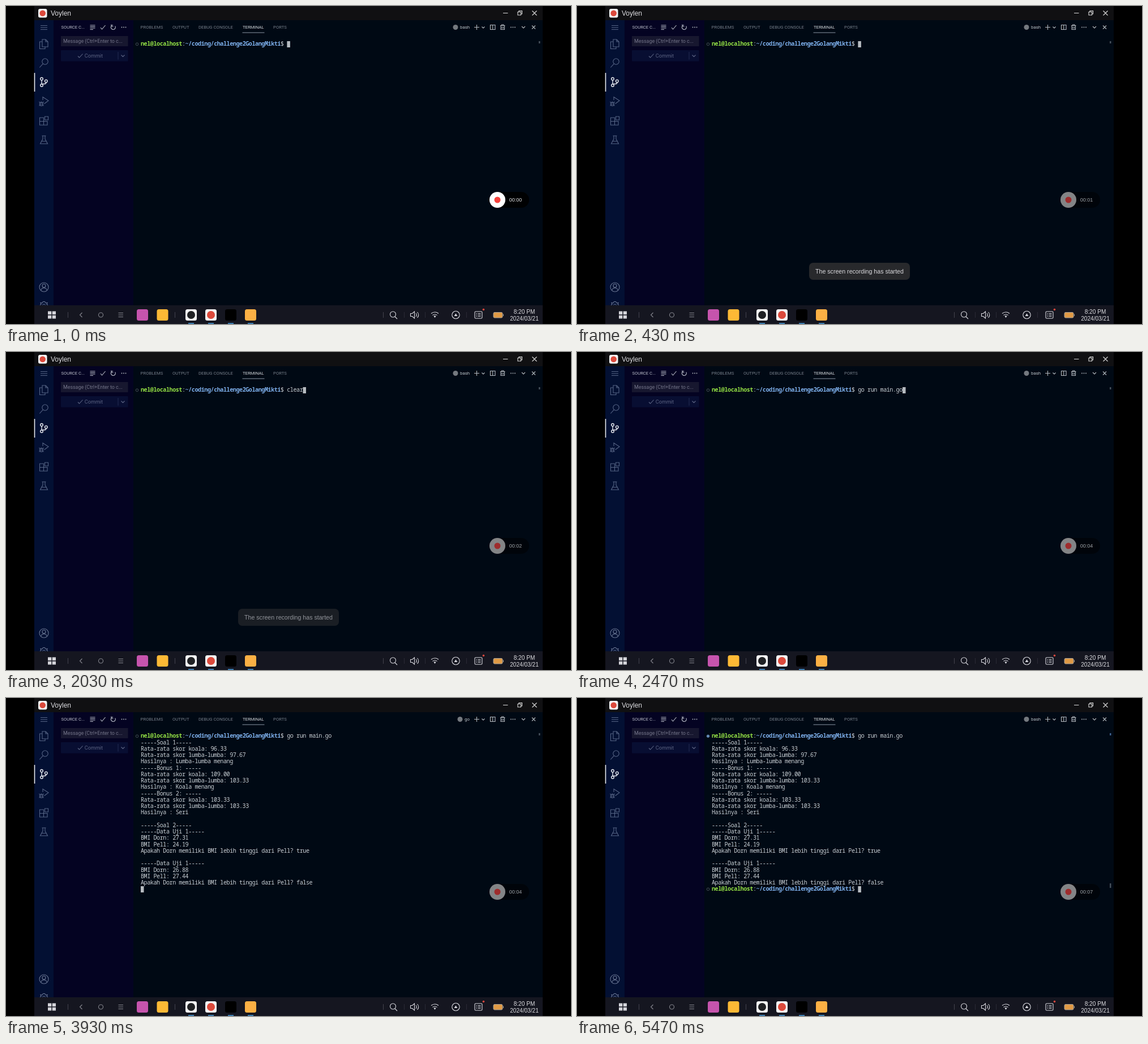
Write an HTML page that moves like this. It is 998 px wide and 561 px high and loops after 6.46 s.

```html
<!DOCTYPE html>
<html lang="en">
<head>
<meta charset="utf-8">
<title>Terminal recording</title>
<style>
  html, body { margin: 0; width: 100%; height: 100%; overflow: hidden; background: #000; }
  svg { display: block; width: 998px; height: 561px; }
  text { white-space: pre; }
  .line { fill: none; stroke-width: 1.1; }
  .bold { stroke-width: 1.4; }
  .ui { font-family: Roboto, sans-serif; }
  .system { font-family: "Liberation Sans", Arial, sans-serif; fill: #dcdce0; }
  /* Characters sit on a fixed cell grid. */
  .mono { font: 10.1px "Noto Sans Mono", monospace; letter-spacing: calc(5.617px - .6em); fill: #cbd0d5; }
  .user { font-weight: 700; fill: #93e045; }
  .path { font-weight: 700; fill: #7eb0ec; }
</style>
</head>
<body>
<svg viewBox="0 0 998 561">
  <rect width="998" height="561"/>
  <rect x="50" width="898" height="26" fill="#101012"/>
  <rect x="50" y="25" width="34" height="503" fill="#031033"/>
  <rect x="84" y="25" width="141" height="503" fill="#040322"/>
  <rect x="225" y="25" width="723" height="503" fill="#000914"/>

  <!-- title bar -->
  <rect x="57" y="5" width="15.5" height="15.5" rx="3" fill="#f4f4f4"/>
  <circle cx="64.7" cy="12.7" r="5.3" fill="#dc4a3c"/>
  <text class="system" x="79" y="17" font-size="12">Voylen</text>
  <path class="line" stroke="#dcdcdc" d="M878 12.5h8.500M904 10.500h5.500v5.500h-5.500zM906 10.500v-2h5.500v5.500h-2M929.500 8.500l8 8M937.500 8.500l-8 8"/>

  <!-- activity bar -->
  <rect x="49.700" y="118" width="1.6" height="33" fill="#e8eaf0"/>
  <g class="line" stroke="#566485">
    <path d="M61 34.500h12M61 38h12M61 41.500h12"/>
    <path d="M64 59h6l4 4v9h-10zM70 59v4h4M64 63h-4.500v12.500h9.500v-3.500"/>
    <circle cx="69" cy="98" r="5.2"/>
    <path d="M65.300 101.800l-6 6.700"/>
    <path d="M65 166v-5.500l10 6.500-7.500 5.500M60 170.500h5v3.500q0 2-2.500 2t-2.500-2zM61 170.500q1.500-3 3 0M58.500 169l1.500 1.500M66.500 169l-1.500 1.500M58.500 173h7.500M58.500 176l1.500-1M66.500 176l-1.500-1"/>
    <path d="M59.500 197h7v13h-7zM59.500 203.500h13.500v6.500h-6.500M73 203.500v6.500M68.500 195h6v6h-6z"/>
    <path d="M63.500 229h7M65 229v5.500l-4.500 8.500h13l-4.500-8.500v-5.500M63 238.500h8"/>
  </g>
  <g class="line bold" stroke="#e6e8ee">
    <circle cx="63" cy="128.600" r="2.300"/><circle cx="63" cy="140" r="2.300"/><circle cx="70.800" cy="132.400" r="2.300"/>
    <path d="M63 131v6.500M70.800 135q0 2.500-3 2.500h-4"/>
  </g>
  <g class="line" stroke="#6a7693">
    <circle cx="67" cy="496" r="8"/><circle cx="67" cy="493.500" r="3"/>
    <path d="M61.500 502q1-4.500 5.500-4.500t5.500 4.500"/>
    <path d="M60 527.500l2-1-1-3 3 .5 1.500-2.500h3l1.500 2.500 3-.5-1 3 2 1M64.500 527.500q2.500-3 5 0"/>
  </g>

  <!-- source control side bar -->
  <text class="ui" x="97.500" y="39.500" font-size="7.600" fill="#bcbfca">SOURCE C...</text>
  <path class="line" stroke="#b9bdc8" d="M148.500 34h9M148.500 36.500h9M148.500 39h9M148.500 41.500h5.500M167 38l2.500 3 6-7M192.800 35.500a4 4 0 1 1-4-2M186 32.500v3.500h3.500"/>
  <rect x="97" y="53" width="118.500" height="18" fill="#17172f"/>
  <text class="ui" x="101" y="65" font-size="8.900" fill="#74758a">Message (Ctrl+Enter to c...</text>
  <rect x="97" y="78" width="118.500" height="19.500" rx="1" fill="#080e32"/>
  <text class="ui" x="138.800" y="91" font-size="9.100" fill="#5d6584">Commit</text>
  <path class="line" stroke="#5d6584" d="M127 88.500l2.500 2.500 6-6.500M203.500 86.500l3 3 3-3"/>
  <path class="line" stroke="#222b52" d="M198 81v13.500"/>

  <!-- panel tabs -->
  <g class="ui" font-size="7.750" fill="#777f8a">
    <text x="237.500" y="39.500">PROBLEMS</text>
    <text x="294" y="39.500">OUTPUT</text>
    <text x="340" y="39.500">DEBUG CONSOLE</text>
    <text x="418" y="39.500" fill="#d8dbdf">TERMINAL</text>
    <text x="472" y="39.500">PORTS</text>
  </g>
  <path class="line" stroke="#8d98a5" d="M417.500 47h39"/>
  <g id="shell">
    <circle cx="794" cy="37.500" r="4.500" fill="#74797f"/>
    <text id="shellName" class="ui" x="802" y="40" font-size="7.900" fill="#bfc4c9"/>
  </g>
  <path class="line" stroke="#b4b9bf" d="M827 37.500h9M831.500 33v9M840.500 36.500l2.500 2.500 2.500-2.500M855.500 33.500h8.500v8h-8.500zM859.700 33.500v8M873 34.500h8.500M875.500 34.500v-1.500h3.500v1.500M874 35v6.500h6.500v-6.500M876 36.500v3.500M878.500 36.500v3.500M911 36l3 3 3-3M929 34.500l6 6M935 34.500l-6 6"/>
  <g id="dots" fill="#b4b9bf"></g>

  <g id="terminal" class="mono"></g>

  <!-- recorder -->
  <rect id="pill" x="854" y="328" width="70" height="28" rx="14"/>
  <circle id="button" cx="868" cy="342" r="14"/>
  <circle id="recordDot" cx="868" cy="342" r="5.500"/>
  <text id="counter" class="system" x="888.700" y="345.200" font-size="9"/>

  <g id="toast">
    <rect x="410" y="453" width="178" height="30" rx="7" fill="#28292c"/>
    <text class="system" x="421" y="472" font-size="10.630">The screen recording has started</text>
  </g>

  <!-- taskbar -->
  <rect x="50" y="528" width="898" height="33" fill="#151620"/>
  <path fill="#d4d4da" d="M74 538.500h6.300v5.800h-6.300zM81.700 538.500h6.300v5.800h-6.300zM74 545.700h6.300v5.800h-6.300zM81.700 545.700h6.300v5.800h-6.300z"/>
  <path class="line" stroke="#41424c" d="M109.500 540v10M298.500 540v10M666.500 540v10"/>
  <path class="line" stroke="#292a35" d="M703.500 540v10M740.500 540v10M813.500 540v10"/>
  <g class="line" stroke="#878890">
    <path d="M134.500 541l-4 4 4 4M198.500 541.500h8.500M198.500 545h8.500M198.500 548.500h8.500"/>
    <circle cx="167.500" cy="545" r="4"/>
  </g>
  <g id="apps"></g>
  <circle cx="327" cy="545" r="7" fill="#202124"/>
  <circle cx="362" cy="545" r="7" fill="#dc4a3c"/>
  <g class="line" stroke="#d8d8de">
    <circle cx="683.500" cy="544" r="5"/>
    <path d="M687 548l4 4"/>
    <path d="M714.500 542.500h3l4-3.500v12l-4-3.500h-3zM724 542q2.500 3 0 6M726.500 540q4.500 5 0 10"/>
    <path d="M751 542.500q6.500-5 13 0M753.500 545.500q4-3 8 0"/>
    <circle cx="794.500" cy="545" r="6.700"/>
    <rect x="828" y="539" width="13" height="12" rx="1.500"/>
    <path d="M830.500 542.500h1.500M833.500 542.500h5M830.500 545h1.500M833.500 545h5M830.500 547.500h1.500M833.500 547.500h5"/>
  </g>
  <path fill="#d8d8de" d="M755.500 547q2-1.500 4 0l-2 3zM791.500 547l3-4.500 3 4.500z"/>
  <circle cx="843.500" cy="535.500" r="1.800" fill="#e8483e"/>
  <rect x="861" y="540.500" width="16" height="9.500" rx="2" fill="#e09a45" stroke="#a7a19a"/>
  <path d="M878.500 543.500v3.500" stroke="#a7a19a"/>
  <g class="system" text-anchor="middle" font-size="10.100">
    <text x="915.500" y="542.500">8:20 PM</text>
    <text x="915.500" y="555">2024/03/21</text>
  </g>
</svg>

<script>
const LOOP = 6460, LEFT = 238, BASELINE = 70.3, ROW = 11.25, CELL = 5.617;
const byId = id => document.getElementById(id);

const prompt = '<tspan class="user">nel@localhost</tspan>:' +
  '<tspan class="path">~/coding/challenge2GolangMikti</tspan>$ ';
const promptLength = prompt.replace(/<[^>]+>/g, '').length;
const runCommand = 'go run main.go';

const output = `-----Soal 1-----
Rata-rata skor koala: 96.33
Rata-rata skor lumba-lumba: 97.67
Hasilnya : Lumba-lumba menang
-----Bonus 1: -----
Rata-rata skor koala: 109.00
Rata-rata skor lumba-lumba: 103.33
Hasilnya : Koala menang
-----Bonus 2: -----
Rata-rata skor koala: 103.33
Rata-rata skor lumba-lumba: 103.33
Hasilnya : Seri

-----Soal 2-----
-----Data Uji 1-----
BMI Dorn: 27.31
BMI Pell: 24.19
Apakah Dorn memiliki BMI lebih tinggi dari Pell? true

-----Data Uji 1-----
BMI Dorn: 26.88
BMI Pell: 27.44
Apakah Dorn memiliki BMI lebih tinggi dari Pell? false`.split('\n');

// Each entry: start time and the values that change then.
const changes = [
  [0, { command: '', stage: 'typing', shell: 'bash', seconds: 0 }],
  [430, { seconds: 1 }],
  [1430, { command: 'clear', seconds: 2 }],
  [2230, { command: '', seconds: 3 }],
  [2470, { command: runCommand, seconds: 4 }],
  [3470, { stage: 'running' }],
  [3570, { shell: 'go' }],
  [3930, { stage: 'printed' }],
  [4200, { stage: 'done' }],
  [4370, { shell: 'bash', seconds: 5 }],
  [5470, { seconds: 7 }]
];

const textLine = (content, row) =>
  `<text x="${LEFT}" y="${BASELINE + row * ROW}">${content}</text>`;

function marker(row, filled) {
  const y = 67.3 + row * ROW;
  return `<circle cx="231.500" cy="${y}" r="2.300" fill="${filled ? '#668bb8' : 'none'}" stroke="${filled ? '#668bb8' : '#59616a'}" stroke-width=".8"/>`;
}

function terminalMarkup({ command, stage }) {
  const printed = stage === 'printed' || stage === 'done';
  const done = stage === 'done';
  const lines = [prompt + command];
  if (printed) lines.push(...output);
  let row = stage === 'typing' ? 0 : lines.length;
  let column = stage === 'typing' ? promptLength + command.length : 0;
  if (done) {
    row = lines.length;
    column = promptLength;
    lines.push(prompt);
  }
  let markup = lines.map(textLine).join('') + marker(0, done);
  markup += `<rect x="941" y="62" width="2.500" height="4" fill="${done ? '#3e618e' : '#444e59'}"/>`;
  if (done) {
    markup += marker(row, false) + '<rect x="941" y="327" width="2.500" height="8" fill="#444e59"/>';
  }
  return markup + `<rect x="${LEFT + column * CELL}" y="${62 + row * ROW}" width="5.500" height="11" fill="#b6bbc0"/>`;
}

const mix = (from, to, amount) =>
  `rgb(${from.map((value, i) => Math.round(value + (to[i] - value) * amount))})`;

// Fades advance in the given number of visible steps.
const steppedFade = (time, start, end, steps) => time < start ? 0 :
  Math.min(1, (Math.floor((time - start) / (end - start) * (steps - 1) + 1e-6) + 1) / steps);

byId('dots').innerHTML = [208, 895.5].map(x =>
  [-3.5, 0, 3.5].map(dx => `<circle cx="${x + dx}" cy="37.500" r=".9"/>`).join('')).join('');

byId('apps').innerHTML = [
  [241, '#c654ad'], [276.5, '#fdb935'], [327, '#f4f4f4'],
  [362, '#f4f4f4'], [397, '#000'], [432, '#fbb044']
].map(([x, color]) =>
  `<rect x="${x - 10}" y="535" width="20" height="20" rx="3.500" fill="${color}"/>` +
  (x > 300 ? `<rect x="${x - 5}" y="559" width="10" height="2" fill="#3a7caf"/>` : '')
).join('');

let shownMarkup = '';
function render() {
  const time = performance.now() % LOOP;
  const state = Object.assign({}, ...changes.filter(([start]) => start <= time).map(([, values]) => values));
  const markup = terminalMarkup(state);
  if (markup !== shownMarkup) byId('terminal').innerHTML = shownMarkup = markup;

  byId('shellName').textContent = state.shell;
  byId('shell').setAttribute('transform', `translate(${state.shell === 'go' ? 8 : 0} 0)`);
  byId('counter').textContent = `00:0${state.seconds}`;

  const dim = steppedFade(time, 30, 230, 4);
  byId('button').setAttribute('fill', mix([255, 255, 255], [131, 132, 134], dim));
  byId('recordDot').setAttribute('fill', mix([246, 65, 60], [158, 44, 45], dim));
  byId('counter').style.fill = mix([224, 226, 228], [158, 162, 166], dim);
  byId('pill').setAttribute('opacity', 0.9 - 0.4 * dim);
  byId('toast').setAttribute('opacity', dim - steppedFade(time, 2030, 2230, 3));
  requestAnimationFrame(render);
}
render();
</script>
</body>
</html>
```
